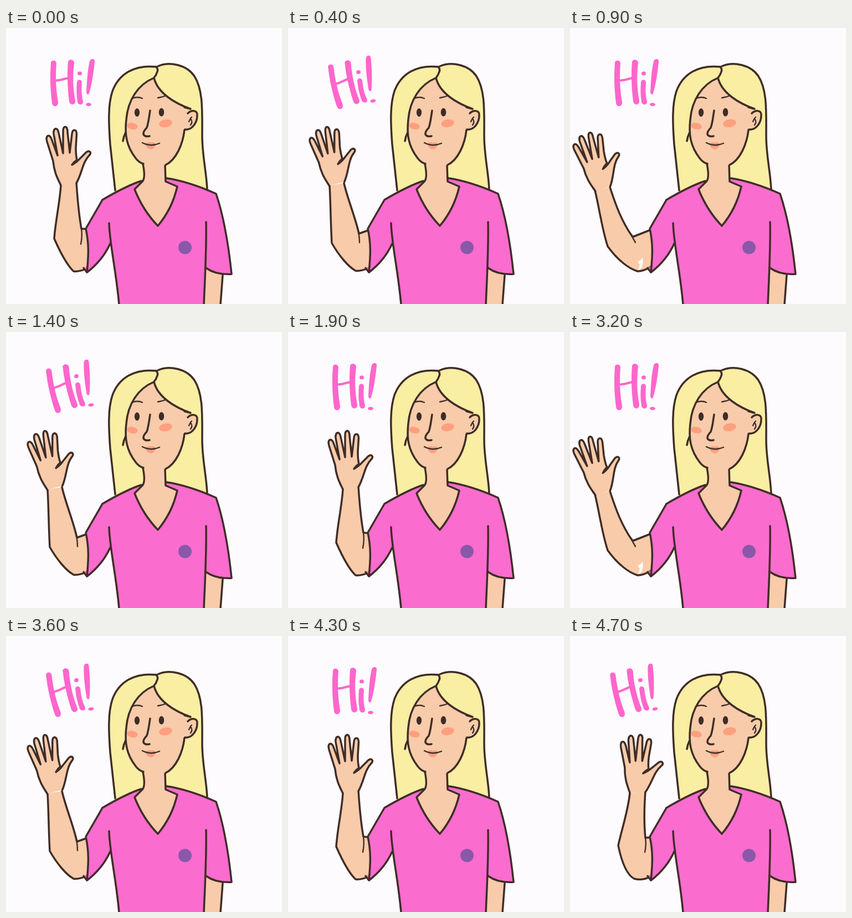
Write an HTML page that moves like this. It is 498 px wide and 498 px high and loops after 4800 ms.

```html
<!DOCTYPE html>
<html lang="en">
<head>
<meta charset="utf-8">
<title>Hi!</title>
<style>
  html, body { margin: 0; width: 100%; height: 100%; overflow: hidden; background: #fdfbfe; }
  svg { display: block; width: 100%; height: 100%; }
  .ink { stroke: #3f2d27; stroke-width: 3.5; stroke-linecap: round; stroke-linejoin: round; }
  .line { fill: none; }
  .thin { stroke-width: 2.4; }
  .skin { fill: #f8cbaa; }
  .hair { fill: #f9eea2; }
  .shirt { fill: #fb6ccf; }
  .blush { fill: #ff9f7e; }
  .brush { fill: #ff66cc; }
</style>
</head>
<body>
<svg viewBox="0 0 498 498">
  <g id="greeting" class="brush">
    <path d="M81 64C80 57 91 57 91 64C89 88 90 112 94 133C95 143 84 144 83 135C80 112 79 86 81 64Z"/>
    <path d="M112 62C112 55 123 56 123 63C120 87 121 110 125 131C126 140 115 140 114 132C111 108 110 84 112 62Z"/>
    <path d="M86 93C96 93 107 89 118 87L119 91C108 93 98 97 87 97Z"/>
    <path d="M128 98C128 92 137 92 137 98C136 111 136 122 139 132C140 140 130 140 129 133C127 121 127 109 128 98Z"/>
    <ellipse cx="133" cy="82" rx="4" ry="3.5"/>
    <path d="M151 60C153 54 161 55 160 61C158 81 155 101 150 118C149 121 145 120 145 116C146 96 147 77 151 60Z"/>
    <ellipse cx="149" cy="138" rx="5" ry="3"/>
  </g>

  <!-- hair behind -->
  <path class="hair" d="M271 70C232 66 204 82 192 114C184 138 185 170 188 210L197 296L363 293C362 262 354 230 354 195C354 150 356 112 340 87C326 66 295 60 274 69Z"/>
  <path class="ink line" d="M271 70C232 66 204 82 192 114C184 138 185 170 188 210L197 293M274 69C295 60 326 66 340 87C356 112 354 150 354 195C354 230 362 262 363 292"/>

  <!-- resting arm -->
  <path class="skin" d="M360 425L392 440L387 499H357Z"/>
  <path class="ink line" d="M391 446L387 499"/>

  <!-- waving arm -->
  <path id="arm" class="ink skin"/>
  <path id="crease" class="ink line thin"/>
  <path id="glint" fill="#fdfbfe" d="M122 421L127 419L131 414L132 423L129 433L123 437L126 428Z"/>
  <path id="hand" class="ink skin" d="M99 284C94 273 87 262 85 240L74 205C71 194 78 190 82 200L93 230L86 191C85 180 93 178 95 189L103 226L103 186C103 175 111 176 111 187L115 225L119 191C120 182 127 182 127.500 191L126 216Q126 230 128 238Q122 242 119 247Q128 242 133 236L145 224C151 220 155 225 150 230C138 242 137 263 127 280"/>

  <!-- shirt and neck -->
  <path class="shirt" d="M246 275C222 283 198 296 174 310L144 363C150 390 148 410 147 430L140 433L147 442C163 429 178 411 189 389C193 425 199 462 203 499H357L361 433C375 443 391 445 407 444C402 396 394 343 379 299C350 286 322 276 290 271Z"/>
  <path class="skin" d="M247 240L249 270L232 291Q247 329 274 357Q300 326 309 285L289 277L287 240Z"/>
  <path class="ink line" d="M247 245C250 260 251 274 245 278L232 291Q247 329 274 357Q300 326 309 286L288 277L287 247M244 276C222 283 198 296 174 310L144 362C150 390 149 410 146 441L140 433M146 441C163 428 178 411 188 389M186 352C187 390 199 440 204 499M290 271C322 276 350 286 379 299C394 343 402 396 407 444C391 445 375 443 361 433M361 350C362 400 359 450 357 499"/>
  <circle cx="323" cy="396" r="12" fill="#8a58a8"/>

  <!-- head -->
  <path class="skin" d="M267 90C238 102 220 130 217 165C214 192 218 214 234 235C245 247 277 249 288 247C307 238 318 210 322 183L333 147C305 135 277 118 267 90Z"/>
  <path class="ink line" d="M267 90C238 102 220 130 217 165C214 192 217 213 234 235Q240 243 248 245M322 184C319 210 307 238 288 247M211 204Q212 196 216 188"/>
  <path class="hair" d="M267 90C274 118 305 136 333 147L345 130L325 85L274 72Z"/>
  <path class="ink line" d="M271 70Q275 74 273 79Q271 85 267 90C274 118 305 136 333 146L322 143"/>
  <path class="ink skin" d="M328 154C335 147 346 148 345 158C345 170 336 185 323 183"/>
  <path class="ink line thin" d="M330 169Q333 162 335 161M334 165Q337 170 333 175"/>

  <!-- face -->
  <g class="blush">
    <ellipse cx="228" cy="177" rx="10" ry="6" transform="rotate(12 228 177)"/>
    <ellipse cx="288" cy="172" rx="12" ry="7" transform="rotate(-10 288 172)"/>
    <path d="M251 209Q256 204 261 207Q266 204 270 209Q268 219 261 219Q254 218 251 209Z"/>
  </g>
  <path class="ink line thin" d="M246 207Q261 215 277 208M228 127Q237 123 246 127M274 126Q281 125 289 122"/>
  <path class="ink line" d="M260 149C258 162 257 172 254 180Q247 187 248 192Q251 197 259 195"/>
  <g id="openEyes" fill="#3f2d27">
    <ellipse cx="236.500" cy="152.500" rx="4.600" ry="7.400"/>
    <ellipse cx="280.500" cy="152" rx="4.800" ry="7.400"/>
  </g>
  <path id="closedEyes" class="ink line thin" d="M232 154Q236 155 241 154M276 154Q280 155 285 154"/>
</svg>
<script>
  const STEP = 400, STEPS = 12, BLINK_STEP = 6;

  // Each arm runs wrist, elbow, under the sleeve, and back to the wrist.
  const poses = {
    up: {
      arm: 'M99 284C97 315 89 350 87 380C98 405 110 428 122 439Q132 440 146 434L156 420V364L136 362C131 335 129 308 127 279',
      crease: 'M136 362Q138 375 135 390',
      hand: [0, 0, 0]
    },
    left: {
      arm: 'M75 284C77 318 77 355 79 388C92 411 109 431 122 438Q132 439 146 433L156 420V361L128 371C121 340 108 310 101 280',
      crease: 'M125 360Q129 374 129 387',
      hand: [-25, -1, -6.5]
    },
    farLeft: {
      arm: 'M45 293C53 325 57 360 68 394C86 419 106 434 122 439Q132 439 146 431L156 420V360L113 377C93 349 82 318 72 287',
      crease: 'M111 373Q114 381 118 387',
      hand: [-54, 8, -9.5]
    },
    right: {
      arm: 'M108 283C105 315 93 350 87 378C92 402 100 430 116 438Q130 442 146 434L156 420V363L136 364C133 335 134 308 136 280',
      crease: 'M136 364Q138 377 135 390',
      hand: [9, 0, 6.5]
    }
  };
  const wave = ['up', 'left', 'farLeft', 'left', 'up', 'right'];

  const el = id => document.getElementById(id);
  const set = (id, name, value) => el(id).setAttribute(name, value);
  const show = (id, on) => set(id, 'visibility', on ? 'visible' : 'hidden');

  function render(time) {
    const step = Math.floor(time / STEP) % STEPS;
    const name = wave[step % wave.length];
    const { arm, crease, hand: [dx, dy, angle] } = poses[name];
    set('arm', 'd', arm);
    set('crease', 'd', crease);
    set('hand', 'transform', `translate(${dx} ${dy}) rotate(${angle} 113 281)`);
    set('greeting', 'transform', `rotate(${step % 2 ? -11 : 0} 118 112)`);
    show('glint', name === 'farLeft');
    show('openEyes', step !== BLINK_STEP);
    show('closedEyes', step === BLINK_STEP);
  }

  const start = performance.now();
  function tick() {
    render(performance.now() - start);
    requestAnimationFrame(tick);
  }
  tick();
</script>
</body>
</html>
```
